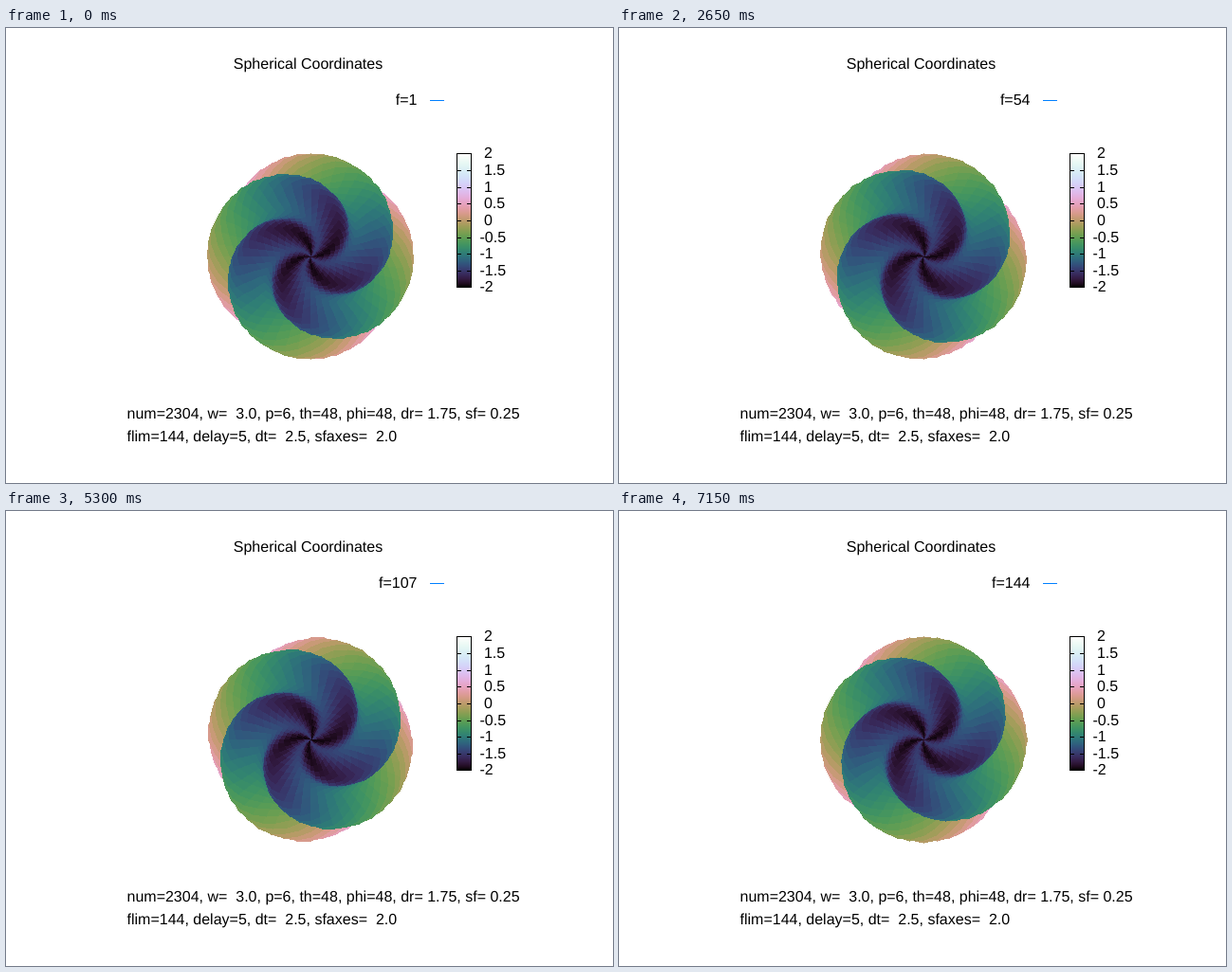
Write an HTML page with a canvas that moves like this. It is 640x480 px and loops after 7.2 s.

```html
<!DOCTYPE html>
<html>
<head>
<meta charset="utf-8">
<style>
html, body { margin: 0; width: 100%; height: 100%; overflow: hidden; background: #fff; }
canvas { display: block; }
</style>
</head>
<body>
<canvas id="stage" width="640" height="480"></canvas>
<script>
const ctx = document.getElementById('stage').getContext('2d');
const FRAMES = 144, DELAY = 50, N = 48;
const CX = 320.5, CY = 240.5, SCALE = 54.5;
const ARMS = 4, TWIST = 8;
const SIZE = 232, LEFT = 205, TOP = 125;
const disc = ctx.createImageData(SIZE, SIZE);
const pixels = new Uint32Array(disc.data.buffer);

// Cubehelix palette over z = -2..2
function shade(z) {
  const v = Math.min(1, Math.max(0, (z + 2) / 4));
  const a = 2 * Math.PI * (0.5 / 3 - 1.5 * v), c = Math.cos(a), s = Math.sin(a);
  const g = Math.pow(v, 1 / 1.5), amp = g * (1 - g) / 2;
  return [-0.14861 * c + 1.78277 * s, -0.29227 * c - 0.90649 * s, 1.97294 * c]
    .map(k => Math.round(255 * Math.min(1, Math.max(0, g + amp * k))));
}

const pack = ([r, g, b]) => (255 << 24 | b << 16 | g << 8 | r) >>> 0;

// Hard-edged even-odd fill, so quads twisted by a fold leave notches
function fillQuad(pts, color) {
  const ys = pts.map(p => p[1]);
  const top = Math.min(...ys), bottom = Math.max(...ys);
  for (let y = top; y <= bottom; y++) {
    const xs = [];
    pts.forEach((p, i) => {
      const q = pts[(i + 1) % 4];
      const [a, b] = p[1] < q[1] ? [p, q] : [q, p];
      if (a[1] === b[1]) return;
      if (y >= a[1] && y < b[1] || y === bottom && y === b[1]) {
        xs.push(Math.round(a[0] + (b[0] - a[0]) * (y - a[1]) / (b[1] - a[1])));
      }
    });
    xs.sort((m, n) => m - n);
    for (let k = 0; k + 1 < xs.length; k += 2) {
      pixels.fill(color, y * SIZE + xs[k], y * SIZE + xs[k + 1] + 1);
    }
  }
}

function vertex(i, j, phase) {
  const polar = Math.PI * i / N, phi = 2 * Math.PI * j / N;
  const r = 1.75 + 0.25 * Math.cos(ARMS * phi - TWIST * polar + phase);
  const rho = SCALE * r * Math.sin(polar);
  return [
    Math.round(CX + rho * Math.cos(phi) - LEFT),
    Math.round(CY - rho * Math.sin(phi) - TOP),
    -r * Math.cos(polar)
  ];
}

// Seen from below: rows nearer the viewer are painted last
function drawSurface(f) {
  const phase = 3 * 2.5 * f * Math.PI / 180;
  const grid = Array.from({ length: N + 1 }, (_, i) =>
    Array.from({ length: N + 1 }, (_, j) => vertex(i, j, phase)));
  pixels.fill(0xffffffff);
  for (let i = N - 1; i >= 0; i--) {
    for (let j = 0; j < N; j++) {
      const quad = [grid[i][j], grid[i][j + 1], grid[i + 1][j + 1], grid[i + 1][j]];
      fillQuad(quad, pack(shade(quad.reduce((sum, p) => sum + p[2], 0) / 4)));
    }
  }
  ctx.putImageData(disc, LEFT, TOP);
}

function text(str, x, y, align = 'left') {
  ctx.textAlign = align;
  ctx.fillText(str, x, y);
}

function drawColorBar() {
  for (let y = 0; y < 141; y++) {
    ctx.fillStyle = `rgb(${shade(2 - 4 * y / 140)})`;
    ctx.fillRect(475, 132 + y, 16, 1);
  }
  ctx.strokeStyle = ctx.fillStyle = '#000';
  ctx.strokeRect(475.5, 132.5, 15, 141);
  for (let i = 0; i <= 8; i++) {
    const v = 2 - i / 2, y = Math.ceil(132 + i * 141 / 8);
    ctx.fillRect(475, y, 5, 1);
    ctx.fillRect(486, y, 5, 1);
    text(v < 0 ? `${v}` : ` ${v}`, 499.5, y + 5);
  }
}

function draw(f) {
  ctx.fillStyle = '#fff';
  ctx.fillRect(0, 0, 640, 480);
  drawSurface(f);
  ctx.font = '16px "Liberation Sans", Arial, sans-serif';
  ctx.textRendering = 'geometricPrecision';
  drawColorBar();
  text('Spherical Coordinates', 318.5, 43, 'center');
  text(`f=${f}`, 433.5, 81, 'right');
  text('num=2304, w=  3.0, p=6, th=48, phi=48, dr= 1.75, sf= 0.25', 127.5, 412);
  text('flim=144, delay=5, dt=  2.5, sfaxes=  2.0', 127.5, 436);
  ctx.fillStyle = '#0080ff';
  ctx.fillRect(447, 76, 15, 1);
}

let shown = 0;
function tick() {
  const f = Math.floor(performance.now() / DELAY) % FRAMES + 1;
  if (f !== shown) draw(shown = f);
  requestAnimationFrame(tick);
}
tick();
</script>
</body>
</html>
```
